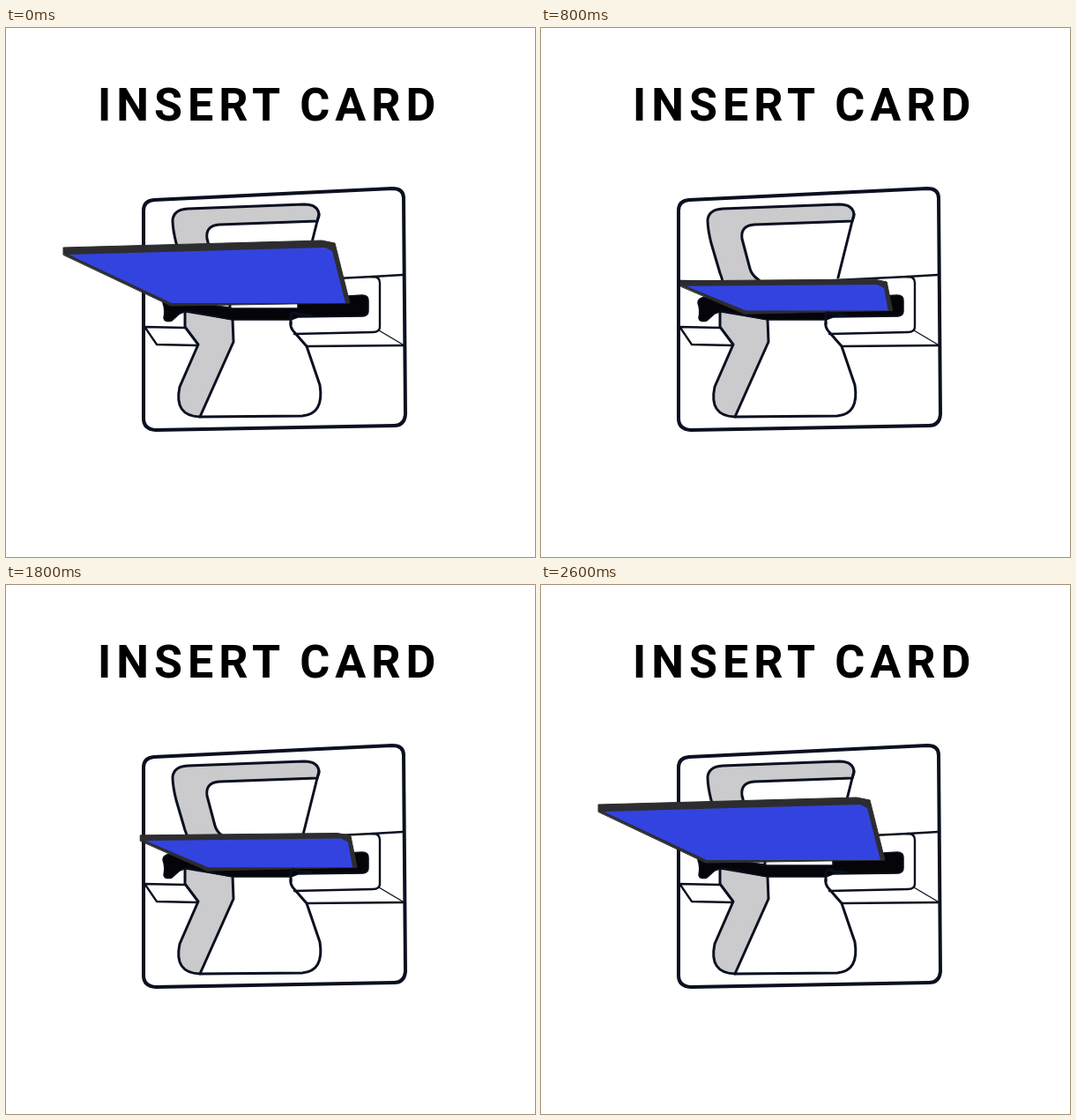
Recreate the animation shown at these times as an HTML page with a canvas. Size 600 by 600 pixels, loop 2.7 s.

```html
<!DOCTYPE html>
<html lang="en">
<head>
<meta charset="utf-8">
<title>Insert card</title>
<style>
  html, body { margin: 0; width: 100%; height: 100%; overflow: hidden; background: #fff; }
  canvas { display: block; width: 600px; height: 600px; }
</style>
</head>
<body>
<canvas id="stage" width="600" height="600"></canvas>
<script>
const ctx = document.getElementById('stage').getContext('2d');
const LOOP = 2700, STEP = 100, RETURN_TIME = 2570;
const INK = '#0a1020', GREY = '#cbcacc', BLUE = '#3343e0', EDGE = '#2d2d2f', BLACK = '#050509';

const panel = 'M156 207Q156 196 168 195L438 182Q451 182 451 193L453 438Q452 451 440 451L170 456Q156 455 156 443Z';
const upperLimb = 'M206 312V290Q206 285 203 278L193 244Q189 228 189 218Q190 206 206 205L338 200Q355 200 355 213L353 219L242 223Q226 224 228 239L237 273Q239 280 246 285Q254 291 254 300V318Z';
const lowerLimb = 'M203 321V339L218 359L197 407Q190 440 220 441L258 356L257 330Z';
const opening = 'M355 211L337 283M323 334Q322 340 327 345L341 361L356 405Q361 438 336 440L220 441';
const bracket = 'M332 308Q323 309 323 301V295Q324 287 335 286L416 282Q424 282 424 289V339Q424 345 416 345L327 347';
const bands = 'M158 287L206 288M157 339L204 340M158 340L171 359L218 360M416 282L450 280M341 361L451 360';
const foldLine = 'M423 343L450 359';
const slot = 'M190 305L205 310L256 318H331V309Q332 307 338 307L404 303Q411 303 411 309V321Q411 326 405 327L331 328L323 331H257L205 321L197 324L188 332Q180 334 179 329Q181 320 178 312Q178 305 190 305Z';
const insertedEdge = 'M206 316L258 321L400 319';
const lip = 'M346 326L333 325Q323 320 323 327V336';

function fill(path, color) {
  ctx.fillStyle = color;
  ctx.fill(new Path2D(path));
}

function stroke(path, width, color = INK) {
  ctx.strokeStyle = color;
  ctx.lineWidth = width;
  ctx.stroke(new Path2D(path));
}

function polygon(points) {
  return 'M' + points.map(p => p.join(' ')).join('L') + 'Z';
}

function ease(time, start, end) {
  const p = Math.min(1, Math.max(0, (time - start) / (end - start)));
  return p * p * (3 - 2 * p);
}

// 0 is raised, 1 is fully inserted; the card pauses briefly as it meets the slot.
function insertionAt(time) {
  const t = time < LOOP / 2 ? time : RETURN_TIME - time;
  return 0.4 * ease(t, 75, 525) + 0.6 * ease(t, 525, 1125);
}

function drawHolder() {
  fill(upperLimb, GREY);
  fill(lowerLimb, GREY);
  stroke(panel, 4);
  [upperLimb, lowerLimb, opening].forEach(path => stroke(path, 3));
  stroke(bracket, 2.4);
  stroke(bands, 2.3);
  stroke(foldLine, 1.4);
  fill(slot, BLACK);
  stroke(slot, 1.5);
}

function drawCard(p) {
  if (p > 0.98) {
    stroke(insertedEdge, 2, '#36363a');
    return;
  }
  const drop = p ** 1.2;
  const settle = 1 - (1 - p) ** 2.5;
  const rim = 8 - 3 * p;
  const left = [65 + 141 * p, 249 + 62 * drop];
  const right = [373 + 29 * p, 244 + 72 * drop];
  const bottomRight = [390 + 13 * p, 312 + 9 * settle];
  const bottomLeft = [187 + 67 * p, 315 + 10 * settle];
  const inset = ([x, y], dx, dy) => [x + dx, Math.min(y + dy, bottomRight[1])];

  const body = polygon([
    inset(left, 0, rim), left, inset(right, -15, -3), right, bottomRight, bottomLeft
  ]);
  fill(body, EDGE);
  stroke(body, 1, EDGE);
  fill(polygon([
    inset(left, 6, rim), inset(right, -11, rim - 3), inset(right, -3, rim + 1),
    inset(bottomRight, -5, 0), inset(bottomLeft, 1, -1)
  ]), BLUE);
}

function drawTitle() {
  ctx.fillStyle = '#000';
  ctx.font = '700 52px Roboto, sans-serif';
  ctx.letterSpacing = '6px';
  ctx.wordSpacing = '-3px';
  ctx.fillText('INSERT CARD', 104, 105);
}

function draw(time) {
  ctx.fillStyle = '#fff';
  ctx.fillRect(0, 0, 600, 600);
  ctx.lineJoin = ctx.lineCap = 'round';
  drawTitle();
  drawHolder();
  drawCard(insertionAt(time));
  stroke(lip, 3);
}

const begin = performance.now();
function tick() {
  const time = (performance.now() - begin) % LOOP;
  draw(Math.floor(time / STEP) * STEP);
  requestAnimationFrame(tick);
}
tick();
</script>
</body>
</html>
```
